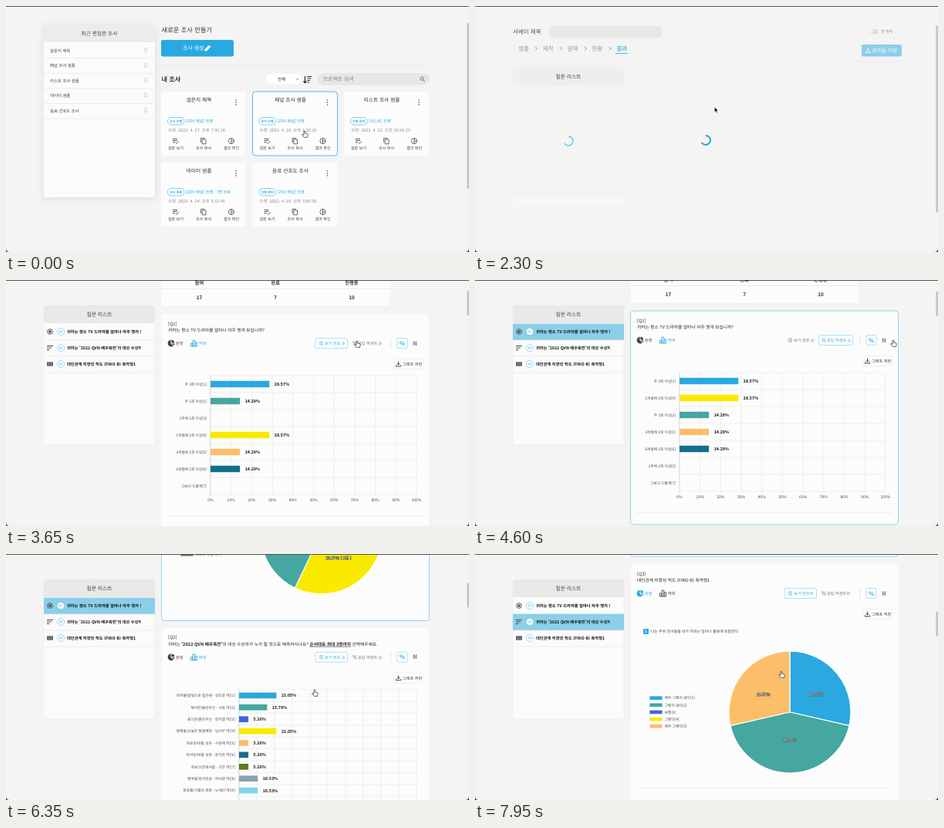
Animation of 600x319 px, one loop 8000 ms. Source, as an HTML page:

```html
<!DOCTYPE html>
<html lang="ko">
<head>
<meta charset="utf-8">
<title>설문 결과</title>
<style>
html, body { margin: 0; width: 100%; height: 100%; overflow: hidden; background: #f4f4f4; }
svg { display: block; width: 600px; height: 319px; font-family: "Noto Sans CJK KR", "Noto Sans CJK", "Noto Sans", sans-serif; font-weight: 500; text-rendering: geometricPrecision; white-space: pre; }
</style>
</head>
<body>
<svg id="stage" viewBox="0 0 600 319">
  <defs>
    <filter id="shadow" x="-20%" y="-20%" width="140%" height="140%">
      <feDropShadow dx="0" dy="2" stdDeviation="4" flood-opacity=".1"/>
    </filter>
    <clipPath id="itemClip"><rect x="79" y="0" width="96" height="319"/></clipPath>
    <pattern id="hatch" width="2" height="2" patternUnits="userSpaceOnUse">
      <rect width="2" height="2" fill="#8fd3e4"/><path d="M0 2L2 0" stroke="#46a6a0" stroke-width=".6"/>
    </pattern>
  </defs>
  <g id="scene"></g>
</svg>
<script>
const LOOP = 8000, BLUE = '#29a9e1', SOFT = '#7cc8ea', INK = '#333', LINE = '#e6e6e6';
const scene = document.getElementById('scene');

const clamp = v => Math.max(0, Math.min(1, v));
const smooth = v => v * v * (3 - 2 * v);
const outQuart = v => 1 - (1 - clamp(v)) ** 4;
const mix = (a, b, p) => a + (b - a) * p;
const fade = (t, from, to) => clamp((t - from) / (to - from));

// Eased values between keys of the form [time, ...values]
function track(keys, t) {
  const i = keys.findIndex(k => k[0] > t);
  if (i === 0) return keys[0].slice(1);
  if (i < 0) return keys[keys.length - 1].slice(1);
  const a = keys[i - 1], b = keys[i], p = smooth(fade(t, a[0], b[0]));
  return a.slice(1).map((v, j) => mix(v, b[j + 1], p));
}

const pointerKeys = [
  [0, 387, 166], [250, 387, 166], [1000, 292, 270], [1450, 292, 270], [2200, 311, 134], [2750, 311, 134],
  [3400, 440, 108], [3650, 455, 83], [3800, 467, 80], [4200, 470, 80], [4600, 542, 82], [4750, 530, 79],
  [4850, 530, 79], [5130, 215, 77], [5230, 215, 77], [5600, 355, 190], [5850, 355, 190], [6100, 400, 180],
  [6450, 400, 180], [6660, 468, 44], [6760, 468, 42], [7020, 219, 43], [7260, 219, 43], [7650, 390, 150], [7900, 397, 156]
];
const scrollKeys = [
  [2620, 0], [3400, 136], [3680, 136], [3880, 140], [6050, 140], [6500, 450], [6700, 450], [6900, 464.5],
  [7300, 464.5], [7780, 739.5]
];

// Drawing helpers; text is placed by its vertical middle
const rect = (x, y, w, h, fill, more = '') =>
  `<rect x="${x}" y="${y}" width="${w}" height="${h}" fill="${fill}" ${more}/>`;
const line = (x1, y1, x2, y2, color = LINE, w = .7) =>
  `<path d="M${x1} ${y1}L${x2} ${y2}" stroke="${color}" stroke-width="${w}"/>`;
const text = (x, y, s, size, fill = INK, more = '') =>
  `<text x="${x}" y="${y + size * .36}" font-size="${size}" fill="${fill}" ${more}>${s}</text>`;
const MID = 'text-anchor="middle"', END = 'text-anchor="end"', BOLD = 'font-weight="700"';
const stroke = (d, color, w = .8) => `<path d="${d}" fill="none" stroke="${color}" stroke-width="${w}"/>`;
const group = (x, y, body) => `<g transform="translate(${x} ${y})">${body}</g>`;
const layer = (opacity, body) => opacity > 0 ? `<g opacity="${opacity}">${body}</g>` : '';
const circle = (x, y, r, fill, more = '') => `<circle cx="${x}" cy="${y}" r="${r}" fill="${fill}" ${more}/>`;

const icons = {
  pin: c => stroke('M-1.6 -3H1.6M-1 -3V0L-2.2 1.4H2.2L1 0V-3M0 1.4V4', c, .6),
  note: c => stroke('M-4 -2.6H2M-4 -.4H2M-4 1.8H-1M0 2.6L1 3.4L4 .4', c, .9),
  copy: c => stroke('M-3.4 2V-3.6H1.6M-1.8 -2H3V3.8H-1.8Z', c, .8),
  result: c => circle(0, 0, 3.6, 'none', `stroke="${c}" stroke-width=".8"`) + stroke('M0 -3.6V3.6M0 0H3.6', c),
  pie: c => `<path d="M-.5 -4.4A4.4 4.4 0 1 0 2.8 3.4L-.5 0Z" fill="${c}"/><path d="M.5 -4.4A4.4 4.4 0 0 1 4.4 -.5H.5ZM4.4 .5A4.4 4.4 0 0 1 3.4 2.9L1 .5Z" fill="${c}"/>`,
  bars: c => stroke('M-4 4V0H-1.4V4ZM-1.4 4V-3.8H1.4V4ZM1.4 4V-1H4V4Z', c, .9),
  save: c => stroke('M0 -3.4V1M-2 -.8L0 1.2L2 -.8M-3.2 1.4V3H3.2V1.4', c, .9),
  list: c => stroke('M-1.4 -2H3M-1.4 0H3M-1.4 2H3M-3 -2H-2.3M-3 0H-2.3M-3 2H-2.3', c, .7),
  percent: c => stroke('M-2 2.4L2 -2.4', c, .7) + circle(-1.5, -1.4, .9, 'none', `stroke="${c}" stroke-width=".6"`) +
    circle(1.5, 1.4, .9, 'none', `stroke="${c}" stroke-width=".6"`)
};
const icon = (name, x, y, color) => group(x, y, icons[name](color));

function spinner(x, y, t, color) {
  return `<g transform="translate(${x} ${y}) rotate(${t * .36 - 828})">` +
    stroke('M0 -6A6 6 0 1 1 -5.2 3', color, 1.9) + '</g>';
}

function pointer(x, y, hand) {
  return hand
    ? group(x, y, '<path d="M-1 -3.6Q0 -4.6 .7 -3.5V-.9L3.7 -.2Q4.4 .2 4.2 1.3L3.4 4.4H-.6L-3.4 1.2Q-3.4 .2 -2.3 .5L-1 1.4Z" fill="#fff" stroke="#222" stroke-width=".7"/>')
    : group(x, y, '<path d="M-.5 -3V3.8L1 2.4L2.1 4.8L3.2 4.3L2.1 2H4.2Z" fill="#111" stroke="#fff" stroke-width=".4"/>');
}

// Survey list page
const recent = ['설문지 제목', '패널 조사 샘플', '리스트 조사 샘플', '데이터 샘플', '음료 선호도 조사'];
const surveys = [
  ['조사 진행', '[ZOV 패널] 진행', '27. 오후 7:36:18'],
  ['조사 진행', '[ZOV 패널] 진행', '26. 오후 1:39:20'],
  ['진행 준비', '[리스트] 진행', '26. 오전 10:46:19'],
  ['조사 종료', '[ZOV 패널] 진행 : 7명 완료', '24. 오후 3:32:48'],
  ['진행 준비', '[ZOV 패널] 진행', '26. 오후 3:06:59']
];

function surveyCard(i, px, py) {
  const x = 201 + (i % 3) * 118.5, y = 111 + Math.floor(i / 3) * 92;
  const hot = px > x && px < x + 110 && py > y && py < y + 83;
  const [state, tag, date] = surveys[i];
  const actions = [['note', '설문 보기', 19], ['copy', '조사 복사', 55], ['result', '결과 확인', 91]];
  return group(x, y,
    rect(0, 0, 110, 83, '#fcfcfc', `rx="4" stroke="${hot ? BLUE : 'none'}" stroke-width=".8"`) +
    text(49, 11, recent[i], 6.7, '#333', MID) +
    [-3, 0, 3].map(d => circle(97, 14 + d, .8, '#444')).join('') +
    rect(8.5, 33.5, 21.5, 9.5, '#fff', `rx="4.5" stroke="${BLUE}" stroke-width=".6"`) +
    text(19.2, 38.3, state, 4.1, BLUE, MID + BOLD) + text(32, 38.3, tag, 5.2, BLUE) +
    text(9, 50, '수정: 2023. 4. ' + date, 5.5, '#8a8a8a') +
    actions.map(([n, s, ax]) => icon(n, ax, 64, '#444') + text(ax, 73, s, 5.1, '#444', MID)).join(''));
}

function listPage(px, py) {
  return rect(49, 24, 144, 224, '#fbfbfb', 'rx="3" filter="url(#shadow)"') + rect(49, 24, 144, 23, '#ececec', 'rx="3"') +
    text(121, 35.5, '최근 편집한 조사', 6.7, '#444', MID) +
    recent.map((s, i) => text(57, 58 + i * 19.5, s, 5.4, '#444') + icon('pin', 181, 57.5 + i * 19.5, '#c8c8c8') +
      line(49, 67.7 + i * 19.6, 193, 67.7 + i * 19.6)).join('') +
    text(201.5, 31, '새로운 조사 만들기', 8.3) +
    rect(201, 44, 94, 21.5, BLUE, 'rx="2.5"') + text(229, 54.5, '조사 생성', 7, '#fff') +
    '<path d="M257.5 58.5V56.3L263 50.8L265.2 53L259.7 58.5Z" fill="#fff"/>' +
    line(201, 77, 548, 77) + text(201.5, 95, '내 조사', 8.2, '#333', BOLD) +
    rect(337, 88, 46, 13.5, '#fff', 'rx="6.5"') + text(352, 95, '전체', 5.6) + stroke('M376 94L377.6 95.6L379.2 94', '#666', .7) +
    stroke('M387.5 91V99.5M385.5 97.5L387.5 99.7L389.5 97.5M390.5 91.5H396M390.5 94H395M390.5 96.5H394M390.5 99H393', '#222', 1.2) +
    rect(404, 87, 145, 15.5, '#e7e7e7', 'rx="7.5"') + text(411, 95, '프로젝트 검색', 6.8, '#888') +
    circle(539, 94.2, 2.1, 'none', 'stroke="#666" stroke-width=".9"') + line(540.5, 95.8, 542.8, 98, '#666', 1) +
    surveys.map((_, i) => surveyCard(i, px, py)).join('');
}

// Result page
const palette = { 1: '#2ca8e0', 2: '#46a6a0', 3: '#4262e6', 4: '#f9ea00', 5: '#fdbe69', 6: '#136f8b', 7: '#5a7b23', 8: '#8a9fb4', 9: '#7fd6ea', 9997: 'url(#hatch)' };
const AWARD = "'2022 QVN 배우축전'";
const titles = ['귀하는 평소 TV 드라마를 얼마나 자주 챙겨 보십니까?', `귀하는 <tspan ${BOLD}>${AWARD}</tspan>의 대상 수상자가 누가 될 것으로 예측하시나요? ` +
  `<tspan ${BOLD} text-decoration="underline">순서대로 최대 3명까지</tspan> 선택해주세요.`, '대인관계 지향성 척도 (FIRO-B) 축약형1'];
const makeRows = (labels, counts) => labels.map((s, i) => ({ id: i === 9 ? 9997 : i + 1, label: s, n: counts[i] }));
const byCount = rows => [...rows].sort((a, b) => b.n - a.n);

const q1 = makeRows(['주 3회 이상', '주 1회 이상', '2주에 1회 이상', '1개월에 1회 이상', '3개월에 1회 이상', '6개월에 1회 이상', '그보다 드물게'],
  [2, 1, 0, 2, 1, 1, 0]);
const q2 = makeRows(['모하율(달빛으로 접은배 - 강도윤 역)', '채이든(붉은우산 - 서호 역)', '표다온(붉은우산 - 한지결 역)', '봉해솔(오늘은 맑을예정 - 남시우 역)',
  '옥로운(바람 성곽 - 구윤재 역)', '탁서담(바람 성곽 - 문가온 역)', '국보늬(은빛서랍 - 고은 역)', '맹여울(유리온실 - 하시원 역)', '방초롬(구름의 정원 - 노해인 역)', '기타'],
  [4, 3, 1, 4, 1, 1, 1, 2, 2, 0]);
const q3 = makeRows(['매우 그렇지 않다', '그렇지 않다', '보통', '그렇다', '매우 그렇다'], [2, 3, 0, 0, 2]);
const total = rows => rows.reduce((s, r) => s + r.n, 0);
const caption = (r, sum, people) => (r.n / sum * 100).toFixed(2) + '%' + (people ? ` ( ${r.n}명 )` : '');

function barChart(rows, before, left, p, people) {
  const sum = total(rows), top = 80, height = 154, width = 532 - left;
  const step = height / rows.length, thick = Math.min(8.4, step * .5);
  let s = '';
  for (let i = 0; i <= 10; i++) {
    const x = left + i * width / 10;
    s += line(x, top, x, top + height + 2, i ? LINE : '#bbb', .6) + text(x, 241, i * 10 + '%', 5, '#444', MID);
  }
  for (let i = 0; i <= rows.length; i++) s += line(left - 3, top + i * step, 532, top + i * step, LINE, .6);
  rows.forEach((r, i) => {
    const y = top + (i + .5) * step, w = mix(before[i].n, r.n, p) / sum * width;
    s += text(left - 5, y, `${r.label}[${r.id}]`, 4.7, '#444', END);
    if (w > .5) s += rect(left, y - thick / 2, w, thick, palette[r.id]);
    if (r.n) s += text(left + 6.5 + w, y, caption(r, sum, people), 5.35, '#111', BOLD);
  });
  return s + line(209, 262, 540, 262);
}

function pieChart(rows, cx, cy, p, people, hot) {
  const sum = total(rows), R = 79, rx = people ? 51 : 44;
  let a = 0, slices = '', labels = '', legend = '';
  rows.forEach((r, i) => {
    const ly = cy + (i - (rows.length - 1) / 2) * 9.15;
    legend += rect(226.4, ly - 2.3, 16.2, 4.6, palette[r.id]) + text(245.7, ly, `${r.label}[${r.id}]`, 4.75, '#444');
    const b = a + r.n / sum * 2 * Math.PI * p, m = (a + b) / 2;
    const at = v => `${cx + R * Math.sin(v)} ${cy - R * Math.cos(v)}`;
    if (r.n && p > 0) {
      slices += `<path d="M${cx} ${cy}L${at(a)}A${R} ${R} 0 ${b - a > Math.PI ? 1 : 0} 1 ${at(b)}Z" fill="${hot === r.id ? '#fbae46' : palette[r.id]}" stroke="#fff" stroke-width="1.2"/>`;
      labels += text(cx + rx * Math.sin(m), cy - 36 * Math.cos(m), caption(r, sum, people), 5.2, '#eee',
        MID + 'stroke="#444" stroke-width=".9" paint-order="stroke" stroke-linejoin="round"');
    }
    a = b;
  });
  return legend + slices + labels;
}

function toggle(x, w, body, on) {
  return (on ? rect(x, 31.5, w, 13, '#fff', `rx="2" stroke="${SOFT}" stroke-width=".6"`) : '') + body(on ? BLUE : '#777');
}

function questionCard(q, y, height, o) {
  const tail = o.dots ? ' ' : ' 순';
  const dot = (x, c) => o.dots ? circle(x, 38, 1.6, 'none', `stroke="${c}" stroke-width=".6"`) : '';
  return group(0, y,
    rect(201.5, 0, 347, height, '#fcfcfc', `rx="4" stroke="${o.active ? SOFT : '#f5f5f5'}" stroke-width=".8"`) +
    text(210, 12.5, `[Q${q}]`, 5.8) + text(210, 21, titles[q - 1], 5.68, '#222') +
    icon('pie', 214, 38, o.pie ? BLUE : '#444') + text(220, 38, '원형', 5.2, o.pie ? BLUE : '#444') +
    icon('bars', 243.5, 38, o.pie ? '#444' : BLUE) + text(250, 38, '막대', 5.2, o.pie ? '#444' : BLUE) +
    toggle(401, 41.5, c => icon('list', 408, 38, c) + text(413, 38, '보기 번호' + tail, 5.2, c) + dot(436, c), !o.sorted) +
    toggle(445.5, 44, c => icon('percent', 452, 38, c) + text(456, 38, '응답 퍼센트' + tail, 5.2, c) + dot(484, c), o.sorted) +
    line(498.5, 32, 498.5, 45, '#ddd') +
    toggle(507, 13, c => text(513.5, 38, '%', 7.6, c, MID + BOLD), true) +
    toggle(523.5, 13, c => text(530, 38, 'N', 7.6, c, MID + BOLD), o.people) +
    rect(503, 58.5, 38, 13, '#fdfdfd', 'rx="2" stroke="#e8e8e8" stroke-width=".6"') + icon('save', 508.5, 65, '#333') +
    text(514, 65, '그래프 저장', 5.2) + o.chart);
}

function questionItems(y, active) {
  const names = [titles[0], `귀하는 ${AWARD}의 대상 수상자가 누가`, titles[2]];
  const marks = [
    circle(57, 0, 3.3, 'none', 'stroke="#444" stroke-width=".9"') + circle(57, 0, 1.7, '#444'),
    stroke('M53 -2.5H61M53 0H59M53 2.5H56', '#444', 1),
    rect(53, -2.6, 8, 5.2, '#555') + stroke('M53 -.8H61M53 1H61M55.6 -2.6V2.6M58.4 -2.6V2.6', '#aaa', .4)
  ];
  return names.map((s, i) => {
    const cy = y + 34 + i * 21;
    return (active === i + 1 ? rect(49, cy - 10.3, 144, 21.3, '#8bcfe9') : '') + group(0, cy, marks[i]) +
      circle(71, cy, 4.6, '#fff', `stroke="${SOFT}" stroke-width=".7"`) + text(71, cy, 'Q' + (i + 1), 4, BLUE, MID) +
      `<g clip-path="url(#itemClip)">${text(79, cy, s, 5.27, '#111', BOLD)}</g>` + line(49, cy + 11, 193, cy + 11);
  }).join('');
}

function summary(y) {
  const cols = [['참여', 17], ['완료', 7], ['진행중', 10]];
  return group(0, y,
    rect(201, 0, 297, 91, '#fcfcfc', 'rx="3" stroke="#ececec" stroke-width=".6"') + rect(201, 0, 297, 24, '#ececea', 'rx="3"') +
    text(349.5, 12, '조사 진행 현황', 6.8, '#444', MID) + line(201, 48, 498, 48) + line(201, 68, 498, 68) +
    cols.map(([s, n], i) => text(250.5 + i * 98.7, 60, s, 6.2, INK, MID + BOLD) +
      text(250.5 + i * 98.7, 79.5, n, 6.4, INK, MID + BOLD)).join(''));
}

function resultPage(t, scroll) {
  const loaded = fade(t, 2450, 2620), ready = mix(.5, 1, loaded), active = t < 3720 ? 0 : t < 6720 ? 1 : 2;
  const steps = ['샘플', '제작', '결제', '현황', '결과'];
  const head = text(49, 33, '서베이 제목', 7.5, '#555') + rect(97, 26, 145, 15, '#e8e8e8', 'rx="2"') +
    rect(511, 30.5, 12, 5.5, '#ddd', 'rx="2.7"') + circle(513.8, 33.2, 2.6, '#fff', 'stroke="#bbb" stroke-width=".5"') +
    text(526, 33, '한개씩', 5.6, '#999') +
    steps.map((s, i) => text(56 + i * 31.8, 55, s, 7.6, i < 4 ? '#999' : '#55b8e2', i < 4 ? '' : BOLD) +
      (i < 4 ? stroke(`M${78 + i * 31.8} 53L${81 + i * 31.8} 55.2L${78 + i * 31.8} 57.4`, '#999', .9) : '')).join('') +
    line(182, 61.5, 198, 61.5, '#55b8e2', 1) + line(49, 71, 553, 71) +
    layer(ready, rect(501, 50, 52, 15.5, BLUE, 'rx="2"') + icon('save', 509.5, 57.5, '#fff') +
      text(514, 57.7, '결과물 저장', 6.8, '#fff'));

  const py = Math.max(33, 79.5 - scroll);
  const panel = layer(ready, rect(49, py, 144, 180.5, '#fbfbfb', 'rx="3" stroke="#ececec" stroke-width=".6"') +
      rect(49, py, 144, 23.3, '#e9e9e7', 'rx="3"')) + text(121, py + 11.7, '질문 리스트', 6.8, '#444', MID) +
    layer(1 - loaded, rect(49, py + 23.3, 144, 145, '#f4f5f3')) + layer(loaded, questionItems(py, active));

  let body = '';
  if (loaded > 0) {
    const sort1 = t >= 3720, pie1 = t >= 5200, people = t >= 4800, hover = t > 5560 && t < 6060;
    const sort2 = t >= 6720, pie2 = t >= 7060;
    const rows1 = sort1 ? byCount(q1) : q1, rows2 = sort2 ? byCount(q2) : q2;
    const tops = [180, 466.3, 752.5].map(v => v - scroll);
    body = summary(79.5 - scroll) +
      questionCard(1, tops[0], 277, {
        active: active === 1, pie: pie1, sorted: sort1, people,
        chart: pie1 ? pieChart(rows1, 408.7, 163.3, outQuart((t - 5200) / 700), people, hover && 5)
          : barChart(rows1, q1, 265, outQuart((t - 3720) / 700), people)
      }) +
      questionCard(2, tops[1], 276.3, {
        active: active === 2, pie: pie2, sorted: sort2, people: false,
        chart: pie2 ? pieChart(rows2, 427.3, 162.6, outQuart((t - 7060) / 700)) : barChart(rows2, q2, 302, outQuart((t - 6720) / 700))
      }) +
      questionCard(3, tops[2], 600, {
        active: false, pie: true, sorted: false, people: false, dots: true,
        chart: rect(218, 84, 7, 7, BLUE, 'rx="1"') + text(221.5, 87.5, '1', 5, '#fff', MID + BOLD) +
          text(228, 87.5, '나는 주위 친구들을 내가 하려는 일이나 활동에 포함한다.', 4.9, '#444') +
          pieChart(q3, 408, 192, 1) + line(209, 291, 540, 291)
      });
    if (hover) body += group(372, 187 + 140 - scroll,
      rect(0, 0, 46, 23.5, '#000', 'rx="2" opacity=".82"') + text(3, 5, '3개월에 1회 이상[5]', 4.5, '#fff', BOLD) +
      text(3, 12, '1번 선택됨', 4.7, '#fff') + rect(3, 16, 5, 5, palette[5], 'stroke="#fff" stroke-width=".5"') +
      text(9.5, 18.6, '14.29%', 4.9, '#fff'));
  }
  return group(0, -scroll, head) + panel + layer(loaded, body) +
    layer(1 - loaded, spinner(121, 175, t, '#8fcfe9') + spinner(299, 174, t, '#31a5d6'));
}

function draw(t) {
  const [px, py] = track(pointerKeys, t), [scroll] = track(scrollKeys, t);
  const [thumbY, thumbH] = t < 1700 ? [22, 215] : t < 2530 ? [25, 243] : [scroll * .1 + .5, 32];
  scene.innerHTML = rect(0, 0, 600, 319, '#f4f4f4') +
    layer(1 - fade(t, 1480, 1680), listPage(px, py)) +
    layer(fade(t, 1780, 2000), resultPage(t, scroll)) +
    rect(597.3, thumbY, 2.7, thumbH, '#c6c6c6', 'rx="1.2"') +
    rect(0, 0, 600, 1, '#555') +
    '<path d="M0 314Q0 319 5 319H0Z" fill="#174f68"/><path d="M600 314Q600 319 595 319H600Z" fill="#333"/>' +
    pointer(px, py, t < 1480 || t > 2800);
}

const start = performance.now();
function tick() {
  draw((performance.now() - start) % LOOP);
  requestAnimationFrame(tick);
}
tick();
</script>
</body>
</html>
```
